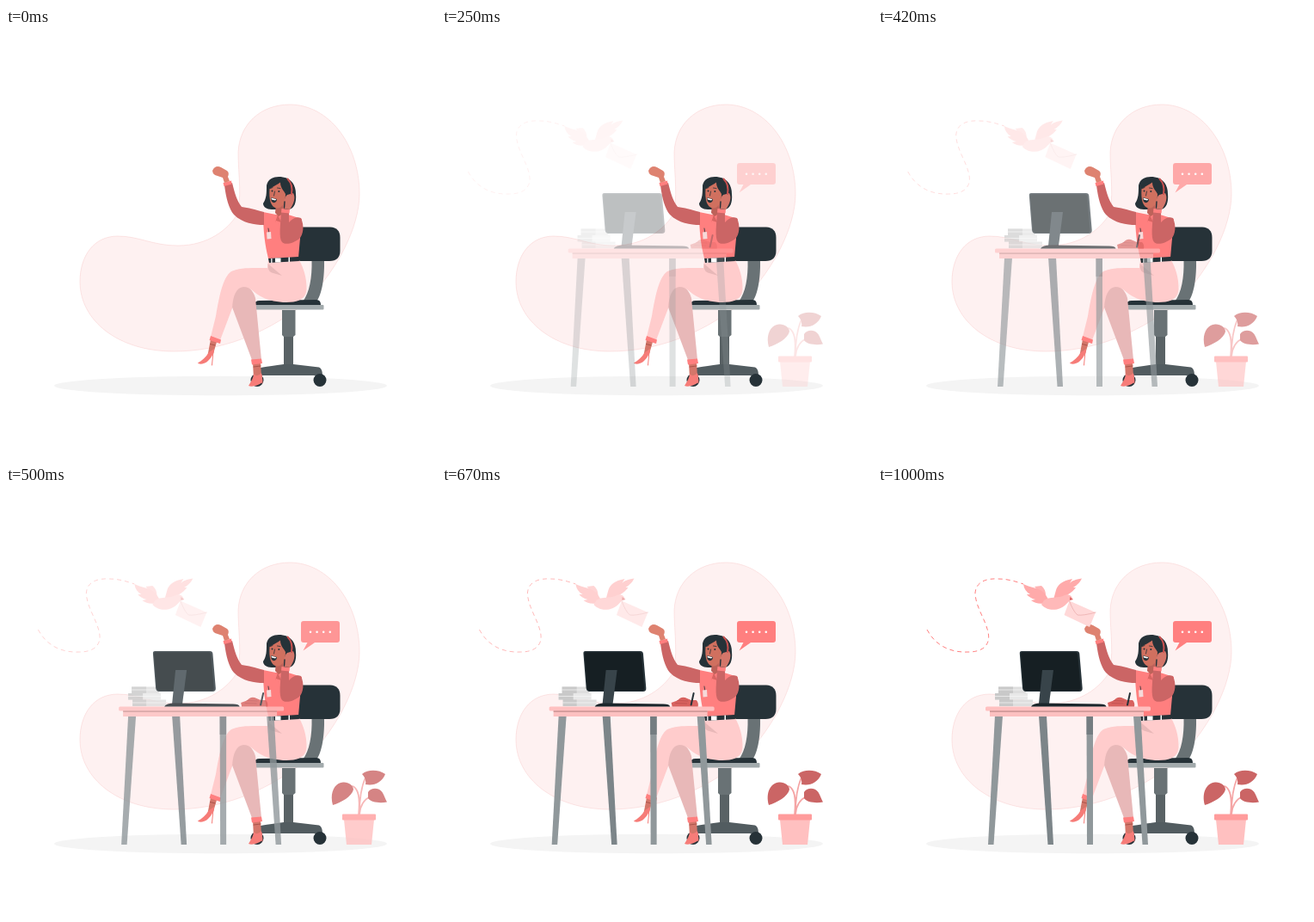
Animation, 500 px wide and 500 px high, one loop 1.04 s. Source, as an HTML page:

```html
<!DOCTYPE html>
<html lang="en">
<head>
<meta charset="utf-8">
<title>Assistant at her desk</title>
<style>
html, body { margin: 0; width: 100%; height: 100%; overflow: hidden; background: #fff; }
svg { display: block; width: 100%; height: 100%; }
.dark { fill: #263238; }
.coral { fill: #ff7f7f; }
.sleeve { fill: #cb6565; }
.skin { fill: #d4766a; }
.pale { fill: #ffcccc; }
.shade { fill: #e8b8b8; }
.line { fill: none; stroke-linecap: round; }
</style>
</head>
<body>
<svg viewBox="0 0 500 500">
  <path fill="#fef1f1" stroke="#f9cccc" stroke-width=".5" d="M330 89C375 89 411 135 411 193C411 231 385 285 342 324C300 356 250 376 195 376C130 376 86 340 86 295C86 265 102 242 130 242C155 242 170 253 200 253C235 253 258 234 268 218C275 200 270 170 270 145C271 113 295 89 330 89Z"/>
  <ellipse cx="249.5" cy="416" rx="193.5" ry="11.3" fill="#f4f4f4"/>

  <g id="chair">
    <path fill="#697275" d="M355.500 270H370C370.500 295 366 312 361 318H345C353 308 356 290 355.500 270Z"/>
    <path class="dark" d="M343 231.500H377Q388.500 232 388.500 244V259Q388.500 271 376 271H338Z"/>
    <path class="dark" d="M289 322Q289 317 295 317L361 316Q366 316 366 322Z"/>
    <rect x="289" y="322" width="80.500" height="5.600" rx="1" fill="#a2aaac"/>
    <path fill="#697275" d="M321 328H336.500V357L334 359H323L321 357Z"/>
    <rect x="323" y="359" width="11" height="34" fill="#596265"/>
    <path fill="#525c60" d="M288 404L290 397Q291 395 323 391H334L364 394.500Q368 396 368 404Z"/>
    <circle class="dark" cx="292" cy="409.500" r="7.500"/>
    <circle class="dark" cx="365" cy="409.500" r="7.500"/>
  </g>

  <g id="woman">
    <!-- legs and shoes -->
    <path class="skin" d="M287 389H296L297 405L288 408ZM238 362L245 365L241 379L234 383Z"/>
    <path class="shade" d="M262 322L266 303C276 296 286 300 290 314L297 386H286Z"/>
    <path class="pale" d="M304 279C288 279 272 278 262 283C252 290 248 312 244 335L238 359L249 363L263 326C264 310 268 302 276 301C285 301 289 309 298 313C308 318 322 320 334 318.500C344 317 349 312 349.500 304C350 291 346 279 341 270H305Z"/>
    <path class="shade" d="M304.500 274L321 288L309 284.500Q304 283 304.500 274Z"/>
    <path class="coral" d="M238 358L250 362.500L249 367L236.500 363ZM285 385.500L297 384.500L298 390L286 391.500Z"/>
    <path fill="#f67c78" d="M236 377L242 373Q242 380 235 387C231 391 224 391.500 223 389.500C228 387 232 383 236 377ZM288 402Q292 407 297 401C297 404 299 409 298 412C293 416.500 285 417.500 282 416C285 411 288 406 288 402Z"/>
    <path class="line" stroke="#f67c78" d="M241 376L239.500 392M297 403L298 413"/>
    <path class="line" stroke="#a9544b" d="M237.500 367.500L243 369M288 394L296 393"/>

    <!-- torso -->
    <path class="coral" d="M299 214L314 217L328 217L344 222L340 267L305 268C301 252 299 236 299 214Z"/>
    <path class="dark" d="M305 268L340 266L341 271L306 273Z"/>
    <path fill="#fff" d="M308.200 268h1.300v5h-1.300zM313 267.500h6.500v5h-6.500zM328.500 266.500h1.500v5.500h-1.500z"/>
    <path fill="#d96563" d="M313 226L316 217L320 226L314 224Z"/>
    <path class="line" stroke="#263238" stroke-width=".8" d="M305 233L306 239"/>
    <path fill="#f6dada" d="M303 237.500L308 237L308.500 245L303.500 245.500Z"/>

    <!-- raised arm -->
    <path class="sleeve" d="M300 214C289 211 282 209 274 208C268 200 266 192 263 180L254 183C256 198 259 210 265 217C275 227 289 229 300 229Z"/>
    <path class="coral" d="M252.500 180L262 177.500L262.500 181.500L253.500 184Z"/>
    <path fill="#de8270" d="M240 166C242 161 246 160 250 162L257 166Q260 168 258 173L260 178L254 180L252 174L243 171Q240 169 240 166Z"/>

    <!-- head -->
    <path class="dark" d="M303 183C305 174 314 172 322 173.500C332 175 337 183 337 193C338 203 335 210 329 211H309C303 211 299 208 299 204C303 198 303 192 303 183Z"/>
    <path fill="#bd6259" d="M314 204H323V215L317 219L313 215Z"/>
    <path fill="#d0705f" d="M306.500 187C311 184 316 182 319 179.500C319 186 323 189 325 193C325 203 321 210 315 209.500C308 208.500 305.500 200 306.500 187Z"/>
    <path class="line" stroke="#263238" stroke-width=".8" d="M307.500 186.500L310 185.500M315.500 186L319 186.500M312.500 190L311.500 195"/>
    <circle class="dark" cx="309.500" cy="189.500" r="1"/>
    <circle class="dark" cx="317.300" cy="190" r="1"/>
    <path class="dark" d="M308 197L315 199C315 203 311 205 308.500 201Z"/>
    <path fill="#fff" d="M308.300 197.500L314.500 199.200L313 200.500L309 199.500Z"/>

    <!-- arm holding the headset -->
    <path class="sleeve" d="M343 221C347 230 346 240 341 245C335 250 325 253 321 249C317 244 319 230 320 214L329 214L329 226Q336 218 343 221Z"/>
    <path class="coral" d="M320.500 210L330 211L329.500 215.500L320 214.500Z"/>
    <path class="skin" d="M322 210C323 202 324 196 327 194L334 192C337 197 335 204 330 211Z"/>
    <path class="line" stroke="#c9504f" stroke-width="2" d="M327.500 175.500Q334 182 332 193"/>
    <path class="line" stroke="#263238" stroke-width="1.400" d="M324 202L323.500 209"/>
  </g>

  <g class="fade">
    <path class="coral" d="M346 157H385Q388 157 388 160V179Q388 182 385 182H359L345.500 191.500L350.500 182H346Q343 182 343 179V160Q343 157 346 157Z"/>
    <path class="line" stroke="#fff" stroke-width="2.600" stroke-dasharray="0 7.600" d="M354 169.800H378"/>
  </g>

  <g class="fade">
    <path class="line" stroke="#f5a5a5" stroke-width="1.700" d="M410 382C412 362 410 352 403 349M411 382C411 365 413 350 418 339M411 382C412 370 417 364 424 361"/>
    <path class="sleeve" d="M380 371C376 357 382 345 392 344.500C398 344 404 348 404 353C402 361 390 368 380 371ZM414 335C421 329 434 330 441 335C437 345 428 349 418 347C419 342 417 338 414 335ZM421 356C425 350 434 351 437.500 356C440 360 441 364 443 367.500C435 369 424 368 421 363Z"/>
    <path fill="#ffc0c0" d="M393 388H428L425 417H396Z"/>
    <rect x="391" y="381.500" width="39" height="7" rx="1" fill="#ff9c9c"/>
  </g>

  <g id="desk">
    <g fill="#90989b">
      <path d="M136 267H145L134.500 417H128Z"/>
      <path fill="#7c8589" d="M187 267H196L204 417H197.500Z"/>
      <path d="M242.500 267H250V417H243Z"/>
      <path d="M297 267H305.500L314 417H307.500Z"/>
    </g>
    <path fill="#747d81" d="M242.500 267H250V289H242.500Z"/>
    <rect x="130" y="261" width="179" height="7" fill="#fcc0c0"/>
    <rect x="130" y="261.200" width="179" height="1.300" fill="#a87676"/>
    <rect x="125" y="256.500" width="192" height="5" rx="1.500" fill="#ffc0c0"/>

    <g fill="#dedede">
      <rect x="140" y="233.500" width="32" height="7.500"/>
      <rect x="136" y="241" width="38" height="7.500" fill="#e8e8e8"/>
      <rect x="141" y="248.500" width="39" height="7.500"/>
      <path fill="#c9c9c9" d="M140 233.500h17v7.500h-17zM136 241h17v7.500h-17zM141 248.500h16v7.500h-16z"/>
      <path class="line" stroke="#f6f6f6" stroke-width=".7" d="M140 237H172M136 244.500H174M141 252H180"/>
    </g>

    <path class="dark" d="M167 192H231Q234 192 234.300 195L237.700 235Q238 239 234 239H172Q168.500 239 168 235L164.800 195Q164.500 192 167 192Z"/>
    <path fill="#161f23" d="M167 193.500H230Q232 193.500 232.300 196L235.500 235Q235.500 238 233 238H172Q169.500 238 169 235L166 195Z"/>
    <path fill="#38444a" d="M191 214H204L199 253H187Z"/>
    <path fill="#1b262b" d="M178 256.500Q180 252.500 190 252.500L258 253.500Q265 253.500 265.500 256.500Z"/>

    <path fill="#d8625f" d="M268 256.500L267 252L274 249.500Q278 244.500 283 246L290 249H296Q299 252 298 256.500Z"/>
    <path class="line" stroke="#b94e4e" stroke-width=".7" d="M274 249.500L286 250M272 252.500L285 253"/>
    <path class="line" stroke="#263238" stroke-width="2" d="M290 254.500L293 241"/>
  </g>

  <g id="bird">
    <path class="line" stroke="#ff7f7f" stroke-dasharray="5 4" style="stroke-linecap:butt" d="M57 167C66 184 82 194 105 193C124 193 131 183 128 170C125 155 113 140 113 124C114 112 125 107 140 108C152 108 163 112 169 114"/>
    <path fill="#ffb3b3" d="M182 117L190 116Q195 120 195 127L188 124Z"/>
    <path fill="#ffaaaa" d="M169 114C176 118 188 118 194 125L200 135C190 138 183 137 178 133L183 132Q176 130 173 126L177 126Q170 122 169 114Z"/>
    <path fill="#ffaaaa" d="M237 107.500C229 109 226 110 223 113L226 108C214 110 209 115 207 121L204 132C217 130 226 124 230 118L227 118Q234 114 237 107.500Z"/>
    <path fill="#ffb9b9" d="M193 133C199 128 210 131 217 127C221 125 226 128 226 131C221 133 219 141 208 143.500C198 145 193 141 190 138Z"/>
    <path fill="#ffd8d8" d="M222.500 133.500L253 147L246 164L216.500 150Z"/>
    <path class="line" stroke="#e8a8a8" stroke-width=".7" d="M222.500 133.500Q227 146 232 150Q238 151 253 147"/>
    <path fill="#e06868" d="M223 129L227 132L223 133Z"/>
  </g>
</svg>
<script>
const SHIFT = 30, LOOP = 1040, FPS = 24;
const desk = document.getElementById('desk');
const bird = document.getElementById('bird');
const faders = document.querySelectorAll('.fade');

// Timing function with the same meaning as CSS cubic-bezier().
function bezier(x1, y1, x2, y2) {
  const at = (a, b, s) => 3 * a * s * (1 - s) ** 2 + 3 * b * s * s * (1 - s) + s ** 3;
  return x => {
    let lo = 0, hi = 1;
    for (let i = 0; i < 24; i++) {
      const mid = (lo + hi) / 2;
      if (at(x1, x2, mid) < x) lo = mid; else hi = mid;
    }
    return at(y1, y2, hi);
  };
}

const overshoot = bezier(.36, -.01, .5, 1.38);
const easeIn = bezier(.42, 0, 1, 1);
const fade = (el, p) => el.setAttribute('opacity', Math.max(0, Math.min(1, p)));

function slide(el, p, from) {
  el.setAttribute('transform', `translate(${from * (1 - p)} 0)`);
  fade(el, p);
}

function draw(ms) {
  const step = Math.floor((ms % LOOP + 5) * FPS / 1000);
  const t = step ? Math.min(1, step / FPS + .028) : 0;
  const p = overshoot(t);
  slide(desk, p, SHIFT);
  slide(bird, easeIn(t), -SHIFT);
  faders.forEach(el => fade(el, p));
}

const start = performance.now();
function tick() {
  draw(performance.now() - start);
  requestAnimationFrame(tick);
}
tick();
</script>
</body>
</html>
```
